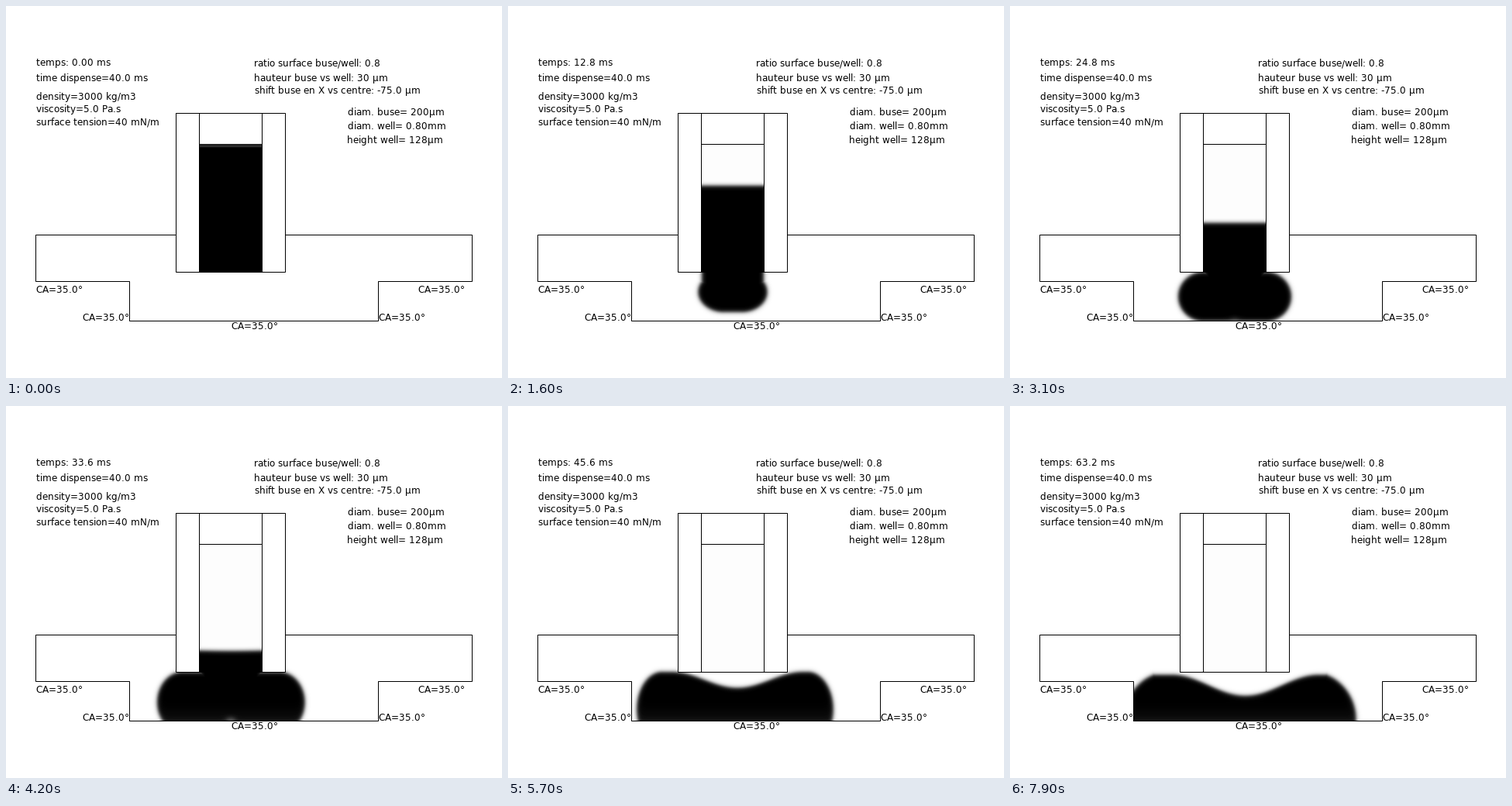
Recreate the animation shown at these times as a matplotlib script. Size 640 by 480 pixels, loop 8 s.

```python
import numpy as np
import matplotlib.pyplot as plt
from functools import lru_cache
from matplotlib.animation import FuncAnimation
from matplotlib.textpath import text_to_path

W, H, DPI = 640, 480, 64
FRAMES, INTERVAL = 80, 100
PX = 72 / DPI  # one pixel in points

plt.rcParams.update({
    "font.family": "DejaVu Sans",
    "font.size": 12 * PX,
    "text.hinting": "force_autohint",
    "text.hinting_factor": 8,
    "toolbar": "None",
})

# Nozzle and well geometry, in pixels
CX, BORE = 290, 40
LIP, FLOOR = 343, 406
X0, X1, Y0, Y1 = 150, 470, 179, 407
STOP = 50  # the dispense ends here

px, py = np.meshgrid(np.arange(X0, X1), np.arange(Y0, Y1))
u, y = px + 0.5 - CX, py + 0.5

bore = (px > 248) & (px < 331) & (py < LIP)
wall = (px > 218) & (px < 361) & (py < LIP) & ~bore
well = (px > 158) & (px < 481) & (py >= LIP)
basin = (py > 295) & (py < 355) & ~wall
domain = bore | well | basin


def sigmoid(v):
    return 0.5 + 0.5 * np.tanh(v / 2)


def blob(n, drift):
    """Signed distance into the pancake that swells below the nozzle."""
    depth = 66 * np.tanh(n / 15) + 1.2 * max(n - 31, 0)
    h = depth / 2
    reach = BORE + 4 * np.log1p(np.exp((min(n, STOP) - 14.5) / 2))
    reach += 40 * (1 - np.exp(-max(n - STOP, 0) / 18))
    rx = 33 + 1.15 * max(n - 57, 0)

    side = np.where(u > 0, u - drift, -u)
    qx = np.maximum(side - (reach - rx), 0) / rx
    qy = (y - LIP - h) / h
    rho = np.hypot(qx, qy)
    body = rho * (1 - rho) / (np.hypot(qx / rx, qy / h) + 1e-9)

    neck = np.where(y < LIP, 1.5 * BORE, BORE) - np.abs(u)
    return np.maximum(body, np.minimum(neck, LIP + h - y))


def surface(n, drift):
    """Height of the free surface: falls in the bore, then sags in the well."""
    level = min(180.5 + 3.2 * n, LIP) + 0.17 * max(n - 57, 0)
    half = 85 + 0.45 * max(n - 57, 0)
    phase = np.clip((u - drift) / half, -1, 1) * np.pi / 2
    return level + 27 * sigmoid((n - 53) / 3.5) * np.cos(phase) ** 2


def darkness(n):
    if n == 0:
        shade = np.where((py == 179) | (py == 181), 0.7, 1)
        return shade * bore
    drift = 0.35 * max(n - 40, 0)
    depth = np.minimum(blob(n, drift), y - surface(n, drift))
    field = sigmoid(depth / 1.5)

    # gas caught under the drop, and a thin film on the floor
    spot = 0.35 * np.exp(-((n - 38) / 7) ** 2)
    film = 0.08 * np.clip((n - 31) / 10, 0, 1)
    field *= 1 - spot * np.exp(-(u / 7) ** 2 - ((y - FLOOR) / 5) ** 2)
    field *= 1 - film * np.exp((y - FLOOR) / 10)
    return np.maximum(field, 0.01 * bore) * domain


fig = plt.figure(figsize=(W / DPI, H / DPI), dpi=DPI, facecolor="white")
ax = fig.add_axes([0, 0, 1, 1])
ax.axis("off")

liquid = ax.imshow(darkness(0), cmap="gray_r", vmin=0, vmax=1, zorder=0,
                   extent=(X0, X1, Y1, Y0), interpolation="nearest", aspect="auto")
ax.set_xlim(0, W)
ax.set_ylim(H, 0)


def line(*pts):
    xs, ys = zip(*pts)
    ax.plot(xs, ys, color="black", lw=PX, solid_joinstyle="miter", zorder=2)


line((219, 295), (38, 295), (38, 355), (159, 355), (159, 406),
     (480, 406), (480, 355), (601, 355), (601, 295), (360, 295))
line((219, 138), (360, 138), (360, 343), (219, 343), (219, 138))
line((249, 138), (249, 343))
line((330, 138), (330, 343))
line((249, 178), (330, 178))

font = ax.title.get_fontproperties().copy()
font.set_size(12 * PX)


def width(s):
    return text_to_path.get_text_width_height_descent(s, font, False)[0] / PX


@lru_cache(None)
def advance(ch):
    """Natural advance of a character, rounded to whole pixels."""
    return round(width(f"|{ch}|") - width("||"))


def label(x, base, s):
    """Set a line of text with every glyph on the pixel grid."""
    glyphs = []
    for ch in s:
        if ch != " ":
            # the offset makes the renderer round the bearing down
            glyphs.append(ax.text(x - 0.49, base, ch, fontproperties=font,
                                  ha="left", va="baseline", zorder=3))
        x += advance(ch)
    return glyphs


for x, base, s in [
    (39, 97, "time dispense=40.0 ms"),
    (39, 121, "density=3000 kg/m3"),
    (39, 137, "viscosity=5.0 Pa.s"),
    (39, 154, "surface tension=40 mN/m"),
    (320, 78, "ratio surface buse/well: 0.8"),
    (320, 97, "hauteur buse vs well: 30 µm"),
    (321, 113, "shift buse en X vs centre: -75.0 µm"),
    (441, 141, "diam. buse= 200µm"),
    (441, 159, "diam. well= 0.80mm"),
    (440, 177, "height well= 128µm"),
]:
    label(x, base, s)
for x, base in [(39, 370), (99, 406), (291, 417), (481, 406), (532, 370)]:
    label(x, base, "CA=35.0°")

clock = []


def update(n):
    ms = 0.8 * n
    for glyph in clock:
        glyph.remove()
    clock[:] = label(39, 77, f"temps: {ms:.{2 if ms < 9.99 else 1}f} ms")
    liquid.set_data(darkness(n))
    return [liquid, *clock]


anim = FuncAnimation(fig, update, frames=FRAMES, interval=INTERVAL,
                     repeat=True, repeat_delay=0, blit=False)
plt.show()
```
